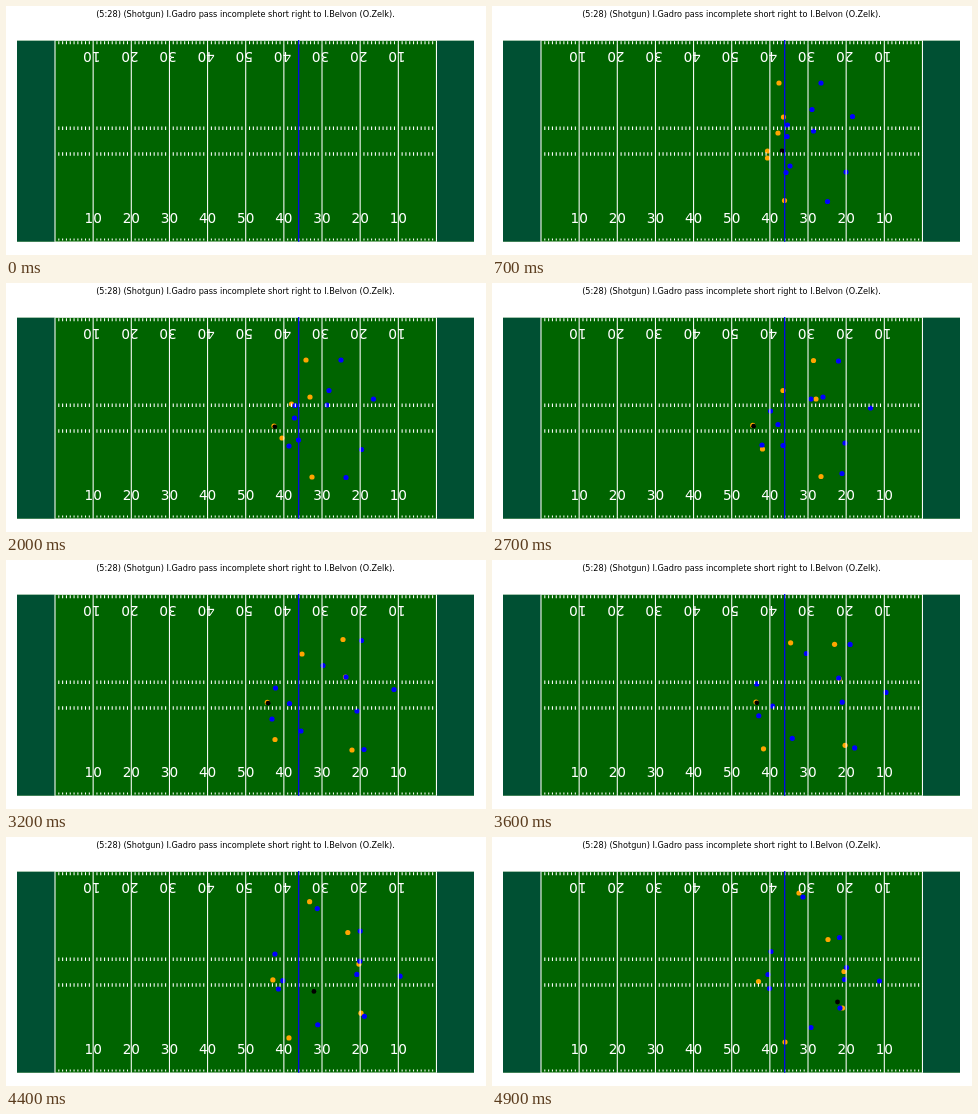
Write an HTML page that moves like this. It is 480 px wide and 249 px high and loops after 5 s.

```html
<!DOCTYPE html>
<html lang="en">
<head>
<meta charset="utf-8">
<title>Passing play</title>
<style>
  html, body { margin: 0; width: 100%; height: 100%; overflow: hidden; background: #fff; }
  svg { display: block; width: 480px; height: 249px; }
  text { font-family: "DejaVu Sans", Verdana, sans-serif; text-anchor: middle; }
  .title { font-size: 8.17px; }
  .yards { font-size: 13.6px; fill: #fff; }
  .lines { stroke: #fff; stroke-width: 1.05; fill: none; }
</style>
</head>
<body>
<svg id="stage" viewBox="0 0 480 249">
  <text class="title" x="239.5" y="11.4">(5:28) (Shotgun) I.Gadro pass incomplete short right to I.Belvon (O.Zelk).</text>
  <rect x="11" y="34.8" width="457" height="200.7" fill="#006400"/>
  <rect x="11" y="34.8" width="37.8" height="200.7" fill="#005033"/>
  <rect x="430.6" y="34.8" width="37.4" height="200.7" fill="#005033"/>
  <g id="dots"></g>
  <path id="marks" class="lines"/>
  <path d="M292.7 34V235.8" stroke="#00f" stroke-width="1.2"/>
  <g id="labels" class="yards"></g>
</svg>
<script>
const LOOP = 5000, STEP = 100;
const SNAP = 1100, CATCH = 1400, THROW = 3850, LAND = 4900;
const TIMES = [1300, 2000, 2700, 3200, 4000, 4900];

// x, y of each player at the moments in TIMES
const offense = [
  [287, 77, 300, 77, 321.5, 77.5, 337, 79.5, 344.5, 90, 336, 102.5],
  [291.5, 111, 304, 114, 324, 116, 339.5, 117, 352, 122, 352, 134.5],
  [286, 127, 285.5, 121, 291, 107.5, 296, 94, 301, 72.5, 307, 56],
  [275.5, 145, 268, 143, 260.8, 142.4, 261.3, 142.4, 266.5, 142, 266.5, 144.5],
  [275.5, 152, 276, 155, 270.5, 166, 269, 179.5, 276, 196.5, 293, 205],
  [292.5, 194.5, 306, 194, 329, 193.5, 346, 190, 356.5, 180.5, 350.5, 171]
];
const defense = [
  [329, 77, 335, 77, 346.5, 78, 355.5, 80.5, 358, 89, 347.5, 100.5],
  [320, 103.5, 323, 107.5, 331, 114, 340, 117, 352, 120, 354.5, 130.5],
  [360.5, 110.5, 367.5, 116, 378.5, 125, 388, 129.5, 397, 135.5, 387.5, 144],
  [321.5, 125, 321, 122, 319, 116, 317, 105.5, 312, 81.5, 311, 60],
  [295.5, 119, 289, 122.5, 278.5, 128, 269.5, 128, 263.5, 119.5, 279, 114.5],
  [295, 130.5, 288.5, 135, 286, 141.5, 283.5, 143.5, 278, 147, 276, 137.5],
  [294, 166.5, 283, 163, 270, 162, 266, 159, 269, 153, 277.5, 151.5],
  [298, 160, 292.5, 157, 291, 162.5, 295, 171, 306, 184.5, 319, 190.5],
  [354, 166, 355.5, 166.5, 353, 160, 351, 151, 350, 136, 352.5, 142.5],
  [335.5, 195.5, 340, 194.5, 350, 190.5, 358, 189.5, 364, 185, 348, 171]
];
const QB = offense[3];
const HIKE = [290, 145], SPOT = [345.5, 165];

const byId = id => document.getElementById(id);
function add(parent, tag, attrs) {
  const el = document.createElementNS("http://www.w3.org/2000/svg", tag);
  for (const key in attrs) el.setAttribute(key, attrs[key]);
  return parent.appendChild(el);
}

const yardX = yd => 49 + (yd - 10) * 3.8145;

function drawField() {
  let d = "";
  for (let yd = 10; yd <= 110; yd++) {
    const x = yardX(yd).toFixed(2);
    d += yd % 10 === 0
      ? `M${x} 34.5V235.8`
      : `M${x} 35.2V38.2M${x} 120.6V124M${x} 146.2V149.7M${x} 232.4V234.6`;
  }
  byId("marks").setAttribute("d", d);

  for (let yd = 20; yd <= 100; yd += 10) {
    const x = yardX(yd), label = 50 - Math.abs(60 - yd);
    add(byId("labels"), "text", { x, y: 217 }).textContent = label;
    add(byId("labels"), "text", { transform: `translate(${x - 1.4} 46.2) rotate(180)` }).textContent = label;
  }
}

// Smooth path through the keys, at rest until the snap
function along(track, time) {
  const keys = [SNAP, ...TIMES];
  const points = [track[0], track[1], ...track];
  const last = keys.length - 1;
  if (time <= SNAP) return [track[0], track[1]];
  let i = 0;
  while (i < last - 1 && time > keys[i + 1]) i++;
  const span = keys[i + 1] - keys[i], u = Math.min(1, (time - keys[i]) / span);
  return [0, 1].map(axis => {
    const at = k => points[2 * k + axis];
    const slope = k => {
      if (k === 0) return 0;
      const next = Math.min(k + 1, last);
      return (at(next) - at(k - 1)) / (keys[next] - keys[k - 1]);
    };
    const a = at(i), b = at(i + 1), v = 1 - u;
    return a * v * v * (1 + 2 * u) + b * u * u * (3 - 2 * u)
      + span * u * v * (slope(i) * v - slope(i + 1) * u);
  });
}

const mix = (a, b, u) => a.map((n, k) => n + (b[k] - n) * u);
const held = time => along(QB, time).map(n => n + 0.8);

function ballAt(time) {
  if (time < SNAP) return HIKE;
  if (time < CATCH) return mix(HIKE, held(CATCH), (time - SNAP) / (CATCH - SNAP));
  if (time < THROW) return held(time);
  return mix(held(THROW), SPOT, (time - THROW) / (LAND - THROW));
}

const dot = (fill, r, where) => ({ el: add(byId("dots"), "circle", { r, fill }), where });

drawField();
const dots = [
  ...offense.map(p => dot("#ffa500", 2.6, time => along(p, time))),
  ...defense.map(p => dot("#00f", 2.6, time => along(p, time))),
  dot("#000", 2.4, ballAt)
];

const start = performance.now();
function draw() {
  const time = Math.floor(((performance.now() - start) % LOOP) / STEP) * STEP;
  byId("dots").style.display = time < STEP ? "none" : "";
  for (const { el, where } of dots) {
    const [x, y] = where(time);
    el.setAttribute("cx", x.toFixed(2));
    el.setAttribute("cy", y.toFixed(2));
  }
  requestAnimationFrame(draw);
}
draw();
</script>
</body>
</html>
```
